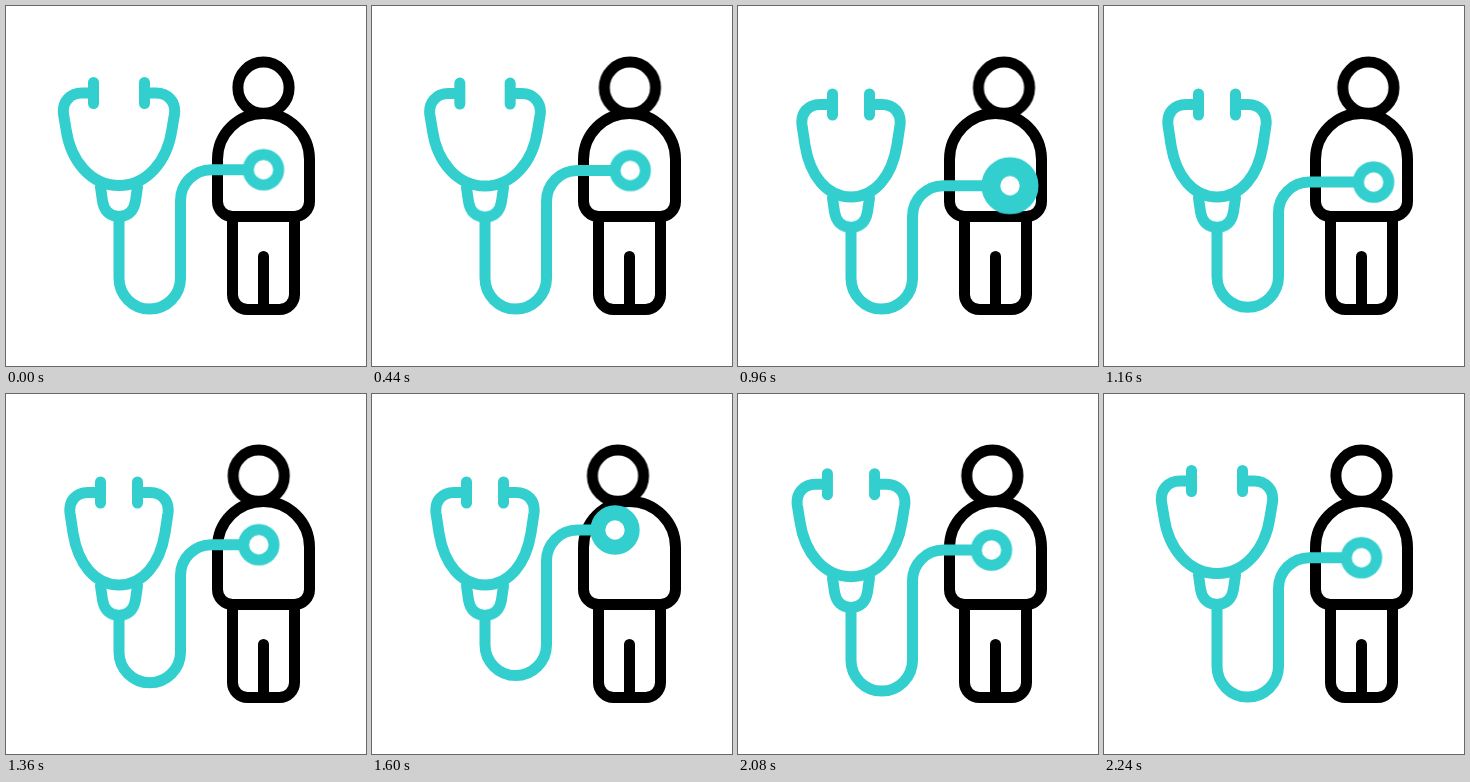
Recreate the animation shown at these times as an HTML page. Size 360 px wide and 360 px high, loop 2.4 s.

```html
<!DOCTYPE html>
<html lang="en">
<head>
<meta charset="utf-8">
<title>Check-up</title>
<style>
  html, body { margin: 0; width: 100%; height: 100%; overflow: hidden; background: #fff; }
  svg { display: block; width: 100%; height: 100%; }

  path, circle { fill: none; stroke-width: 11px; stroke-linecap: round; stroke-linejoin: round; }
  .patient { stroke: #000; }
  .scope { stroke: #33cfcf; }
  .scope .pad { fill: #fff; }

  .head, .headset, .cup, .hose, .place, .pad {
    animation: 2400ms cubic-bezier(.333, 0, .667, 1) infinite;
  }
  .head { animation-name: head; }
  .headset { animation-name: headset; }
  .cup { animation-name: cup; }
  .hose { animation-name: hose; }
  .place { animation-name: place; }
  .pad { animation-name: press; }

  /* rest, low right, high left, rest */
  @keyframes head {
    0%, 15.833%, 93.333%, 100% { transform: translateX(0); }
    35%, 45% { transform: translateX(8.5px); }
    64.167%, 74.167% { transform: translateX(-11.5px); }
  }
  @keyframes place {
    0%, 15.833%, 93.333%, 100% { transform: translate(257.5px, 163.7px); }
    35%, 45% { transform: translate(272px, 179.7px); }
    64.167%, 74.167% { transform: translate(243px, 136px); }
  }
  @keyframes press {
    0%, 35%, 45%, 64.167%, 74.167%, 100% { r: 15.2px; stroke-width: 11px; }
    40%, 69.167% { r: 19.1px; stroke-width: 18.8px; }
  }
  @keyframes hose {
    0%, 15.833%, 93.333%, 100% {
      d: path("M113 211 V272.3 C113 289.3 126.8 303 143.7 303 S174.5 289.3 174.5 272.3 V194.5 C174.5 177.5 188.3 163.7 205.3 163.7 H242");
    }
    35%, 45% {
      d: path("M113 222 V272.3 C113 289.3 126.8 303 143.7 303 S174.5 289.3 174.5 272.3 V210.5 C174.5 193.5 188.3 179.7 205.3 179.7 H257");
    }
    64.167%, 74.167% {
      d: path("M113 222 V250.8 C113 267.8 126.8 281.5 143.7 281.5 S174.5 267.8 174.5 250.8 V166.8 C174.5 149.8 188.3 136 205.3 136 H228");
    }
  }
  @keyframes headset {
    0%, 15.833%, 93.333%, 100% {
      d: path("M87.5 76.5 V97.5 M138.5 76.5 V97.5 M87.5 87 H76 C64 87 56 96 57.5 108 L60 123 C64.5 155 85 179.5 113 179.5 S161.5 155 166 123 L168.5 108 C170 96 162 87 150 87 H138.5");
    }
    35%, 74.167% {
      d: path("M94.5 88 V109 M131.5 88 V109 M94.5 98.5 H82 C70 98.5 62.5 107 64 119 L67 139 C72 170 89 191 113 191 S154 170 159 139 L162 119 C163.5 107 156 98.5 144 98.5 H131.5");
    }
  }
  @keyframes cup {
    0%, 15.833%, 93.333%, 100% { transform: translateY(0); }
    35%, 74.167% { transform: translateY(10.8px); }
  }
</style>
</head>
<body>
<svg viewBox="0 0 360 360">
  <g class="patient">
    <path d="M226.5 210.5 V288.5 A15 15 0 0 0 241.5 303.5 H273.5 A15 15 0 0 0 288.5 288.5 V210.5 M257.5 250.5 V303.5"/>
    <path d="M211.5 153.5 A46 46 0 0 1 303.5 153.5 V195.5 A15 15 0 0 1 288.5 210.5 H226.5 A15 15 0 0 1 211.5 195.5 Z"/>
    <circle class="head" cx="257.5" cy="81.7" r="25.6"/>
  </g>
  <g class="scope">
    <path class="hose"/>
    <path class="cup" d="M94.5 181 L96.5 195 C98 205 104 210.5 113 210.5 S128 205 129.5 195 L131.5 181"/>
    <path class="headset"/>
    <g class="place"><circle class="pad" r="15.2"/></g>
  </g>
</svg>
</body>
</html>
```
